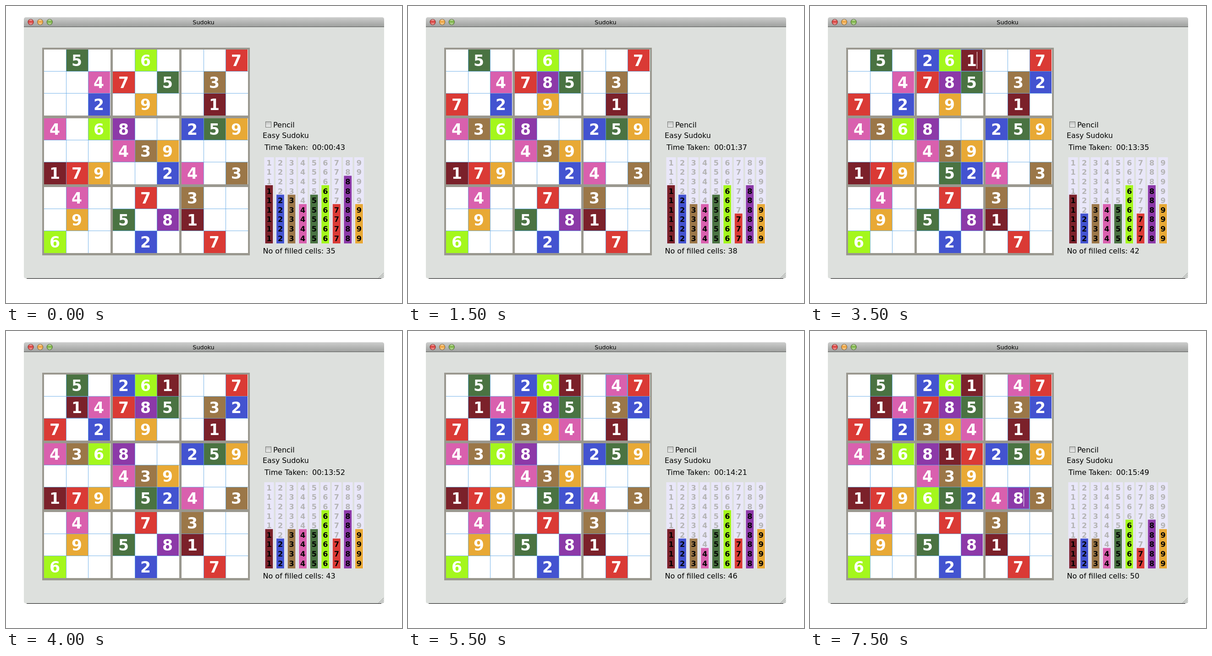
Recreate the animation shown at these times as an HTML page. Size 864 px wide and 648 px high, loop 8 s.

```html
<!DOCTYPE html>
<html lang="en">
<head>
<meta charset="utf-8">
<title>Sudoku</title>
<style>
  html, body { margin: 0; width: 100%; height: 100%; overflow: hidden; background: #fff; }
  svg { display: block; }
  text { font-family: "DejaVu Sans", Verdana, sans-serif; font-size: 16px; white-space: pre; }
  .digit { font-size: 33px; font-weight: bold; fill: #fff; text-anchor: middle; }
  .tally { font-weight: bold; text-anchor: middle; }
  .focus { fill: none; stroke: #68a4e2; stroke-width: 1.3; }
</style>
</head>
<body>
<svg width="864" height="648" viewBox="0 0 864 648">
  <defs>
    <linearGradient id="bar" x2="0" y2="1">
      <stop offset="0" stop-color="#cdcecd"/><stop offset="1" stop-color="#9c9e9c"/>
    </linearGradient>
    <linearGradient id="box" x2="0" y2="1">
      <stop offset="0" stop-color="#bfc1bf"/><stop offset="1" stop-color="#f0f1f0"/>
    </linearGradient>
    <linearGradient id="shine" x2="0" y2="1">
      <stop offset="0" stop-color="#fff" stop-opacity=".75"/>
      <stop offset=".4" stop-color="#fff" stop-opacity=".05"/>
      <stop offset="1" stop-color="#fff" stop-opacity=".6"/>
    </linearGradient>
  </defs>

  <path d="M39 46H825V590Q825 594 821 594H43Q39 594 39 590Z" fill="#dde0dd"/>
  <path d="M39 46V29Q39 24.500 44 24.500H820Q825 24.500 825 29V46Z" fill="url(#bar)"/>
  <path d="M39 45.500H825" stroke="#555755"/>
  <path d="M45 594.500H819" stroke="#000"/>
  <path d="M813 593.500L824 582.500M817 593.500L824 586.500M821 593.500L824 590.500" stroke="#858785"/>
  <g id="lights"></g>
  <text x="431" y="40" text-anchor="middle" style="font-size:12.8px">Sudoku</text>

  <rect x="566.500" y="252.500" width="12" height="12" fill="url(#box)" stroke="#777977"/>
  <text x="583" y="265">Pencil</text>
  <text x="560" y="288" style="font-size:15.800px">Easy Sudoku</text>
  <text x="564" y="314">Time Taken:</text>
  <text x="668" y="314" id="time"></text>
  <text x="560.500" y="540" id="count"></text>

  <rect x="79" y="91" width="453" height="453" fill="#9a988f"/>
  <g id="board"></g>
  <g id="chart"></g>
</svg>
<script>
const STEP = 500, LOOP = 8000;
const COLORS = ["#fff", "#7b212a", "#4353d0", "#9b7748", "#d960ae",
                "#4a7342", "#a4f71c", "#da3a35", "#8c39a8", "#e8a935"];
const START = ["050060007", "004705030", "002090010",
               "406800259", "000439000", "179002403",
               "040070300", "090508100", "600020070"];
// Each move: row, column, digit; "|" shows the text caret.
const MOVES = ["313", "207", "148", "545", "032|", "182", "051|", "111",
               "254", "233", "074", "341", "357", "536", "578|"];
const TIMES = ["00:43", "01:07", "01:17", "01:37", "12:50", "13:10", "13:24", "13:35",
               "13:52", "14:02", "14:11", "14:21", "14:46", "15:04", "15:27", "15:49"];

const byId = id => document.getElementById(id);
const rect = (x, y, w, h, fill) =>
  `<rect x="${x}" y="${y}" width="${w}" height="${h}" fill="${fill}"/>`;
const label = (cls, x, y, s, fill = "") =>
  `<text class="${cls}" x="${x}" y="${y}"${fill && ` fill="${fill}"`}>${s}</text>`;
const cellX = c => 83 + 48 * c + 6 * Math.floor(c / 3);
const cellY = r => 95 + 48 * r + 6 * Math.floor(r / 3);

function boardSvg(grid, move) {
  let out = "", digits = "";
  for (let r = 0; r < 9; r += 3)
    for (let c = 0; c < 9; c += 3) out += rect(cellX(c), cellY(r), 145, 144, "#fff");
  grid.forEach((row, r) => row.forEach((n, c) => {
    if (!n) return;
    out += rect(cellX(c), cellY(r), 48, 48, COLORS[n]);
    digits += label("digit", cellX(c) + 23.5, cellY(r) + 36, n);
  }));
  let lines = "";
  for (let b = 0; b < 9; b += 3)
    for (let d = 0; d < 9; d += 3)
      for (const k of [48, 96])
        lines += `M${cellX(b) + k + .5} ${cellY(d)}v144M${cellX(b)} ${cellY(d) + k - .5}h145`;
  out += `<path d="${lines}" stroke="#62a9e6" stroke-opacity=".85"/>` + digits;
  if (move) {
    const x = cellX(+move[1]), y = cellY(+move[0]);
    out += `<rect class="focus" x="${x + .5}" y="${y - .2}" width="47" height="47.500"/>`;
    if (move[3]) out += rect(x + 35, y + 5, 1, 37, "#fff");
  }
  return out;
}

function chartSvg(grid) {
  let out = "";
  for (let n = 1; n <= 9; n++) {
    const x = 563.5 + 24.55 * (n - 1);
    const placed = grid.flat().filter(v => v === n).length;
    const top = 329.2 + 20.6 * placed;
    out += rect(x, 330, 21, 188, "#e9e7f9") + rect(x + 2, top, 16.8, 518 - top, COLORS[n]);
    for (let i = 0; i < 9; i++)
      out += label("tally", x + 10.5, 347.7 + 20.6 * i, n, i < placed ? "#b4b4b4" : "#000");
  }
  return out;
}

function show(step) {
  const grid = START.map(row => [...row].map(Number));
  for (const [r, c, n] of MOVES.slice(0, step)) grid[r][c] = +n;
  byId("board").innerHTML = boardSvg(grid, MOVES[step - 1]);
  byId("chart").innerHTML = chartSvg(grid);
  byId("time").textContent = "00:" + TIMES[step];
  byId("count").textContent = "No of filled cells: " + grid.flat().filter(Boolean).length;
}

byId("lights").innerHTML = ["#d6302c", "#eb9a2c", "#6fac35"].map((color, i) => {
  const x = 54 + 20.6 * i;
  return `<circle cx="${x}" cy="35" r="6.300" fill="${color}" stroke="#555" stroke-opacity=".7"/>` +
         `<ellipse cx="${x}" cy="35" rx="4.800" ry="5.400" fill="url(#shine)"/>`;
}).join("");

let shown = -1;
function tick() {
  const step = Math.floor(performance.now() % LOOP / STEP);
  if (step !== shown) show(shown = step);
  requestAnimationFrame(tick);
}
tick();
</script>
</body>
</html>
```
